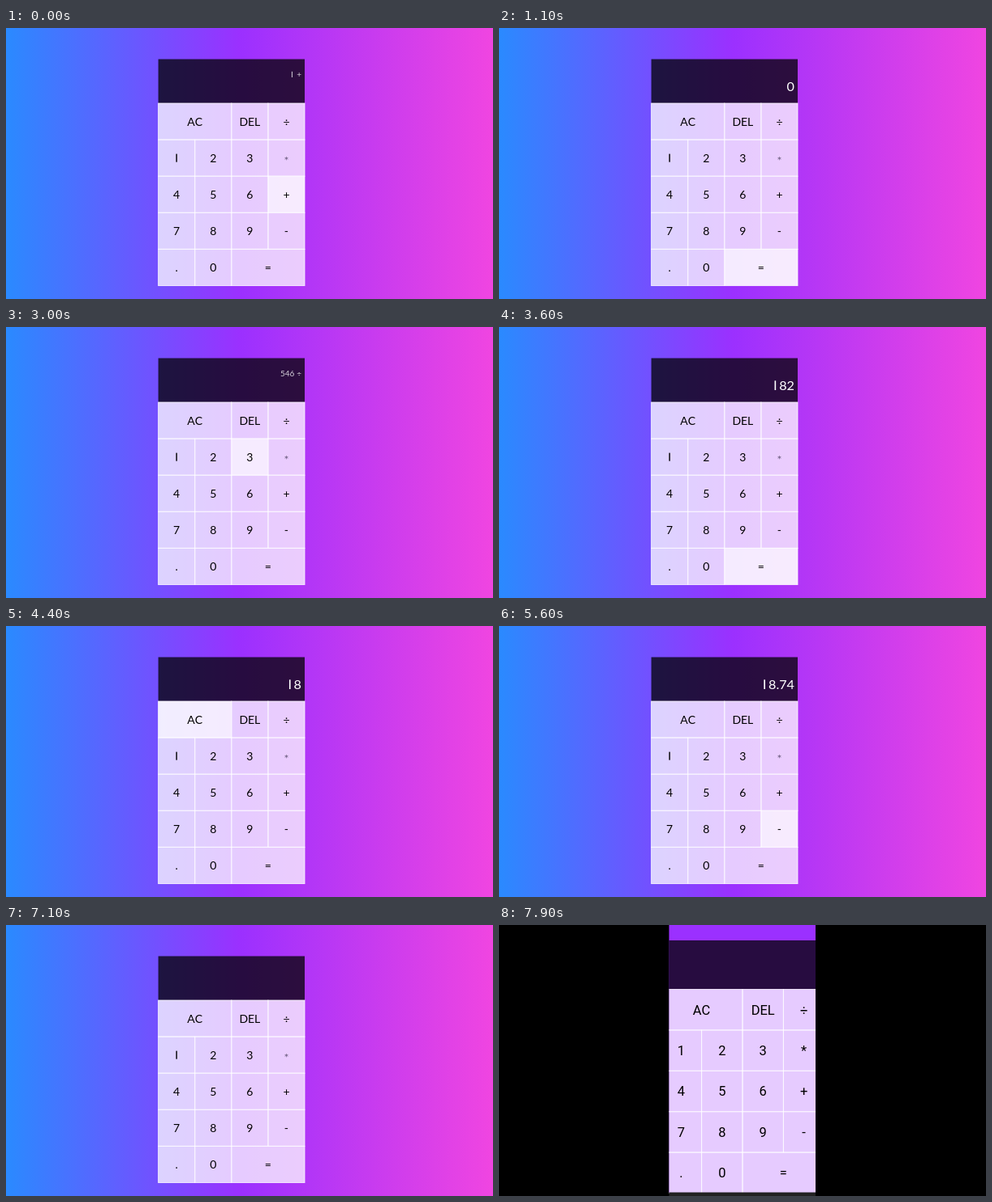
Recreate the animation shown at these times as an HTML page with a canvas. Size 600x335 px, loop 8 s.

```html
<!DOCTYPE html>
<html lang="en">
<head>
<meta charset="utf-8">
<title>Calculator</title>
<style>
  html, body { margin: 0; width: 100%; height: 100%; overflow: hidden; background: #000; }
  canvas { display: block; }
</style>
</head>
<body>
<canvas id="stage" width="600" height="335"></canvas>
<script>
const ctx = document.getElementById('stage').getContext('2d');
const LOOP = 8000, PHONE_AT = 7200;

// Each key: label, column, row, column span
const keys = [['AC', 0, 0, 2], ['DEL', 2, 0, 1], ['÷', 3, 0, 1]];
['123*', '456+', '789-'].forEach((row, r) =>
  [...row].forEach((label, c) => keys.push([label, c, r + 1, 1])));
keys.push(['.', 0, 4, 1], ['0', 1, 4, 1], ['=', 2, 4, 2]);

// Each step: time, hovered key, previous operand, current operand
const steps = [
  [0, '+', '1 +', ''], [100, '-', '1 +', ''], [200, '-', '1 -', ''],
  [300, '8', '1 -', ''], [400, '4', '1 -', ''], [500, '1', '1 -', ''],
  [600, '1', '1 -', '1'], [700, '5', '1 -', '1'], [800, '=', '1 -', '1'],
  [1000, '=', '', '0'], [1200, '8', '', '0'], [1300, '5', '', '0'],
  [1400, 'AC', '', '0'], [1500, 'AC', '', ''], [1700, '2', '', ''],
  [1800, '5', '', ''], [1900, '5', '', '5'], [2000, '4', '', '5'],
  [2100, '4', '', '54'], [2300, '5', '', '54'], [2400, '6', '', '54'],
  [2500, '6', '', '546'], [2600, '*', '', '546'], [2700, '÷', '', '546'],
  [2800, '÷', '546 ÷', ''], [3000, '3', '546 ÷', ''], [3200, '3', '546 ÷', '3'],
  [3300, '6', '546 ÷', '3'], [3400, '9', '546 ÷', '3'], [3500, '=', '546 ÷', '3'],
  [3600, '=', '', '182'], [3700, '9', '', '182'], [3800, '3', '', '182'],
  [4000, 'DEL', '', '182'], [4100, 'DEL', '', '18'], [4300, 'AC', '', '18'],
  [4600, '1', '', '18'], [4700, '4', '', '18'], [4800, '7', '', '18'],
  [5000, '.', '', '18.'], [5100, '7', '', '18.'], [5200, '7', '', '18.7'],
  [5300, '4', '', '18.7'], [5400, '4', '', '18.74'], [5500, '9', '', '18.74'],
  [5600, '-', '', '18.74'], [5700, '-', '18.74 -', ''], [6000, '9', '18.74 -', ''],
  [6100, '6', '18.74 -', ''], [6300, 'DEL', '18.74 -', ''],
  [6400, 'AC', '18.74 -', ''], [6500, 'AC', '', ''], [6700, '', '', '']
];

const desktop = { x: 187.6, y: 93, unit: 45.1, size: 14, font: 'Lato, sans-serif' };
const phone = { x: 199.2, y: 79.5, unit: 50.4, size: 16.5, font: 'Roboto, sans-serif' };

function box(x, y, w, h, fill) {
  ctx.fillStyle = fill;
  ctx.fillRect(x, y, w, h);
}

// anchor: 0.5 centres the text on x, 1 ends it there; the desktop face has a bar for 1
function text(s, x, y, size, anchor, { font }, color) {
  ctx.font = `${size}px ${font}`;
  ctx.fillStyle = color;
  const bars = font.startsWith('Lato');
  const width = c => c === ' ' ? 0.28 * size
    : bars && c === '1' ? 0.6 * size : ctx.measureText(c).width;
  x -= anchor * [...s].reduce((sum, c) => sum + width(c), 0);
  for (const c of s) {
    if (bars && c === '1')
      ctx.fillRect(x + 0.25 * size, y - 0.72 * size, 0.1 * size, 0.72 * size);
    else ctx.fillText(c, x, y);
    x += width(c);
  }
}

function keypad(look, hovered) {
  const { x, y, unit, size } = look;
  for (const [label, col, row, span] of keys) {
    const left = x + col * unit, top = y + row * unit, w = span * unit;
    box(left, top, w, unit, `rgba(255,255,255,${label === hovered ? 0.9 : 0.75})`);
    ctx.strokeStyle = 'rgba(255,255,255,.75)';
    ctx.lineWidth = 1;
    ctx.strokeRect(left, top, w, unit);
    const star = look === desktop && label === '*';
    text(label, left + w / 2, top + unit / 2 + 0.36 * size + (star ? 3 : 0),
      size, 0.5, look, star ? '#66587a' : '#000');
  }
}

function drawDesktop(t) {
  const [, hovered, previous, current] = steps.findLast(s => s[0] <= t);
  const sky = ctx.createLinearGradient(0, 0, 600, 0);
  sky.addColorStop(0, '#2a8aff');
  sky.addColorStop(0.48, '#9b30ff');
  sky.addColorStop(1, '#f045e1');
  box(0, 0, 600, 335, sky);
  box(187.6, 38.5, 180.4, 54.5, 'rgba(0,0,0,.75)');
  keypad(desktop, hovered);
  text(previous, 364, 61, 10, 1, desktop, 'rgba(255,255,255,.8)');
  text(current, 364, 78, 16.2, 1, desktop, '#fff');
}

function drawPhone() {
  box(0, 0, 600, 335, '#000');
  ctx.save();
  ctx.beginPath();
  ctx.rect(209.5, 0, 180.5, 335);
  ctx.clip();
  box(209, 0, 182, 331, '#9b30ff');
  box(209, 19, 182, 60.5, 'rgba(0,0,0,.75)');
  keypad(phone, '');
  box(209, 330.5, 182, 5, '#222');
  ctx.restore();
}

function frame() {
  const t = performance.now() % LOOP;
  if (t < PHONE_AT) drawDesktop(t);
  else drawPhone();
  requestAnimationFrame(frame);
}
frame();
</script>
</body>
</html>
```
